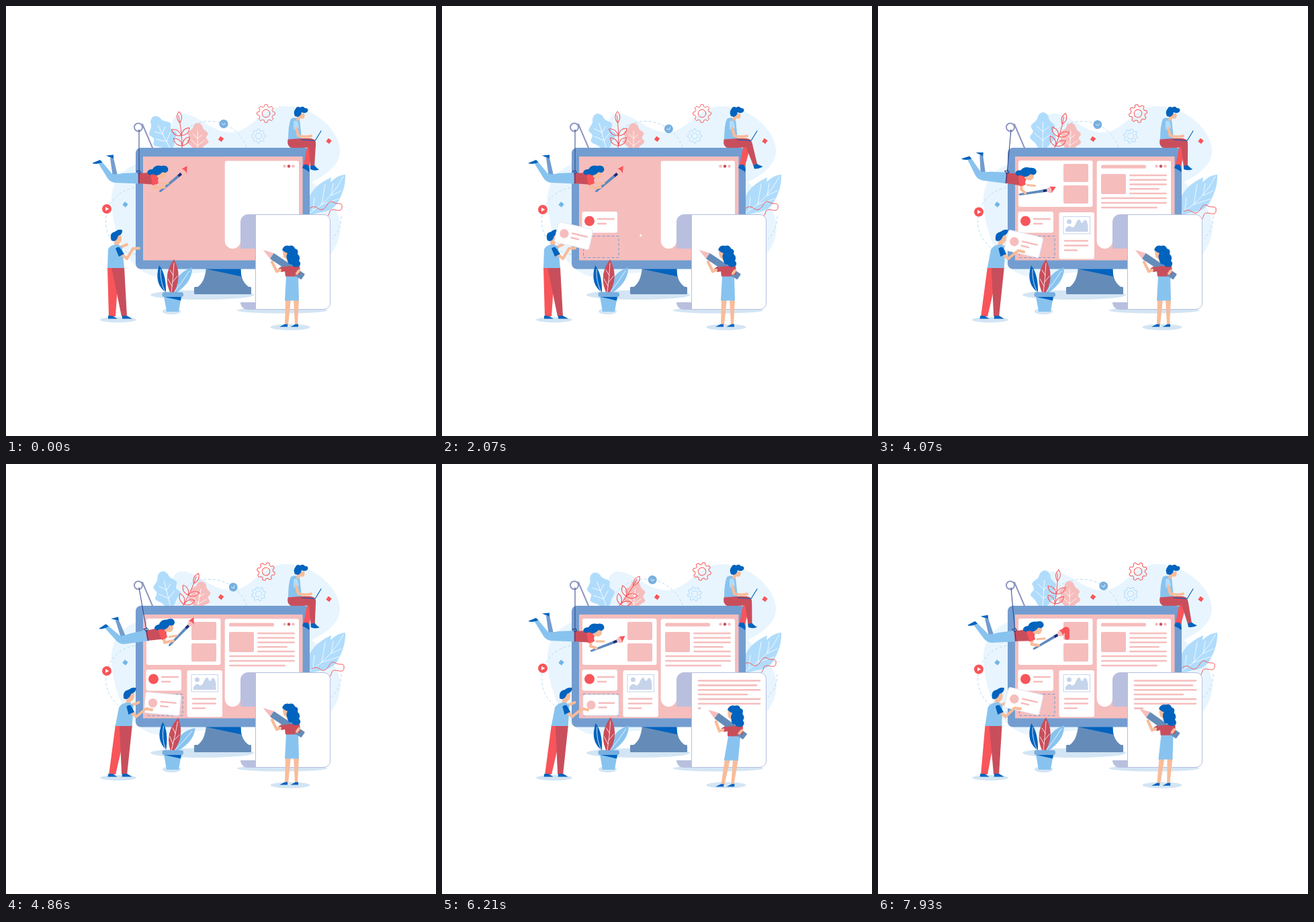
Animation of 640x640 px, one loop 8 s. Source, as an HTML page:

```html
<!DOCTYPE html>
<html lang="en">
<head>
<meta charset="utf-8">
<title>Building a web page</title>
<style>
html, body { margin: 0; width: 100%; height: 100%; overflow: hidden; background: #fff; }
svg { display: block; width: 100vw; height: 100vh; }
.navy { fill: #0063be } .steel { fill: #739dd0 } .blue { fill: #88c3ef } .sky { fill: #b0dcfc }
.pink { fill: #f6bdbd } .red { fill: #f8555a } .wine { fill: #c94e5c } .skin { fill: #f8bc9a }
.lilac { fill: #b9c0df } .shade { fill: #d3e5f4 } .white { fill: #fff }
.line { fill: none; stroke-linecap: round; stroke-linejoin: round; }
.vein { stroke: #fff; stroke-width: .8 }
.dash { fill: none; stroke: #b5dcf6; stroke-dasharray: 4 3 }
.arm { stroke: #f8bc9a; stroke-width: 4.2 }
.text { stroke: #f6bdbd; stroke-width: 2.6 }
</style>
</head>
<body>
<svg viewBox="0 0 640 640">
  <path fill="#e8f5fe" d="M205 232C170 240 155 265 157 295C160 335 178 395 225 403L470 380C495 365 500 335 497 320C494 300 470 275 455 262C480 250 498 235 497 213C493 180 455 149 415 149C380 150 365 188 335 188C305 188 285 160 262 160C248 160 246 175 247 185C245 205 230 225 205 232Z"/>
  <g class="dash">
    <circle cx="303" cy="230" r="58.5"/>
    <circle cx="198.500" cy="320" r="50"/>
    <path d="M499 313A49 49 0 0 1 485 347"/>
  </g>

  <g id="oak"><path class="sky" id="oakShape"/><path class="line vein" d="M0 0V-40M0 -13L-12 -23M0 -13L11 -22M0 -26L-9 -34M0 -26L8 -33"/></g>
  <g id="rose"><path class="pink" id="roseShape"/><path class="line vein" d="M0 0V-29M0 -7L-10 -16M0 -7L10 -15M0 -18L-7 -24M0 -18L6 -23"/></g>
  <g id="twig" class="line" stroke="#f8555a"></g>
  <g id="check"><circle r="6.500" fill="#78b0e0"/><path class="line vein" d="M-2.500 -.8L0 1.700L2.800 -1.200"/></g>
  <g id="play"><circle r="7" class="red"/><path class="white" d="M-2 -3L3.300 0L-2 3Z"/></g>
  <g id="gears" class="line"></g>
  <rect class="red" x="-3" y="-3" width="6" height="6" transform="translate(320 198) rotate(35)"/>
  <rect class="red" x="-3" y="-3" width="6" height="6" transform="translate(480.500 201) rotate(35)"/>
  <rect x="-3" y="-3" width="6" height="6" fill="#70b5e8" transform="translate(177.500 295.500) rotate(38)"/>

  <path class="sky" d="M450 312V288Q456 268 484 255L483 262Q493 252 505 251Q506 270 495 290Q488 305 468 307Z"/>
  <path class="line vein" d="M452 308Q485 288 502 254M470 295L475 265M468 296L495 287M484 282L487 264M484 282L499 275M457 304L459 285"/>
  <path id="squiggle" class="line" stroke="#f8555a" d="M452 301C462 294 464 305 471 303S479 287 487 292S501 290 500 300S484 298 482 306S474 318 469 317"/>

  <ellipse class="shade" cx="292" cy="430" rx="77" ry="7"/>
  <ellipse class="shade" cx="411" cy="453" rx="67" ry="4.500"/>
  <ellipse class="shade" cx="167" cy="467" rx="27" ry="4"/>
  <ellipse class="shade" cx="246.500" cy="454.500" rx="13.500" ry="4.500"/>
  <ellipse class="shade" cx="423" cy="478" rx="29.500" ry="4.500"/>

  <path fill="#658cb9" d="M298 390C296 406 292 414 284 419H363C354 414 350 406 349 390Z"/>
  <path class="navy" d="M296 391H349.500L350 402.500Z"/>
  <rect x="280" y="418" width="85" height="11" rx="1.500" fill="#658cb9"/>
  <rect class="steel" x="193" y="211" width="259" height="180.500" rx="8"/>
  <rect class="pink" x="204" y="224" width="237.500" height="154.500"/>

  <path class="white" d="M329 230.500H433a3 3 0 0 1 3 3V312H360L349 321V349.500a11.600 11.600 0 0 1 -23.300 0V233.500a3 3 0 0 1 3.300 -3Z"/>
  <circle class="pink" cx="414.500" cy="238.500" r="2.300"/>
  <circle class="wine" cx="421" cy="238.500" r="2.300"/>
  <circle class="pink" cx="427.500" cy="238.500" r="2.300"/>
  <rect id="title" class="pink" x="332" y="236.500" width="67" height="5.300" rx="2.600"/>
  <rect id="picture" class="pink" x="332" y="250" width="37" height="30" rx="2"/>
  <g id="article" class="pink"></g>

  <g id="panel"><rect class="white" x="209" y="230" width="110.500" height="69" rx="3"/></g>
  <rect id="tile1" class="pink" x="276" y="235" width="37" height="27" rx="2"/>
  <rect id="tile2" class="pink" x="276" y="267" width="37" height="27" rx="2"/>
  <path id="paint" class="line" stroke="#f8555a" stroke-width="7" pathLength="1" stroke-dasharray="1 2" d="M274 250Q282 243 281.500 248V258"/>

  <g id="cardA">
    <rect class="white" x="208.500" y="306" width="52.500" height="31.500" rx="3"/>
    <circle class="red" cx="219.500" cy="320" r="7.500"/>
    <path class="line text" d="M232 317H256M232 324H244"/>
  </g>
  <g id="imageCard">
    <rect class="white" x="269.500" y="307" width="52.500" height="69.500" rx="3"/>
    <path class="line text" d="M278 349.500H312M278 356.500H312M278 363.500H296"/>
  </g>
  <g id="image" fill="#c6d4eb">
    <rect x="276" y="313.500" width="39.500" height="25.500" fill="#fff" stroke="#c6d4eb"/>
    <circle cx="284.500" cy="321" r="3.500"/>
    <path d="M279 336V332Q284 325 288 329Q291 331 294 325Q298 315 301 319Q303 325 305 322Q308 315 311 321L312.500 327V336Z"/>
  </g>
  <rect id="slot" x="210.500" y="342.500" width="52.500" height="32" fill="none" stroke="#739dd0" stroke-dasharray="4 3"/>

  <path class="lilac" d="M373 310H360.500A11.500 11.500 0 0 0 349 321.500V361H373ZM349 441H373V452H360A11 11 0 0 1 349 441Z"/>
  <path fill="#fff" stroke="#b5bfe0" d="M371.500 310.500H473a9.500 9.500 0 0 1 9.500 9.500V442a9.500 9.500 0 0 1 -9.500 9.500H371.500Z"/>
  <g id="writing" class="line text"></g>

  <!-- flower pot -->
  <g id="potLeaves">
    <path class="navy" d="M240 428Q219 414 228 386Q239 400 238 428Z"/>
    <path class="blue" d="M248 428Q250 398 277 389Q278 411 252 428Z"/>
    <path class="wine" d="M245 428Q232 402 250 377Q264 403 249 428Z"/>
    <path class="line vein" d="M237 426Q229 410 230 392M246 426Q249 405 250 383M251 425Q262 412 273 394M247 417L241 406M248 411L255 402M249 401L244 393"/>
  </g>
  <path class="blue" d="M235 432H261L257 455H239Z"/>
  <path class="navy" d="M236 433H261L260 438.500Z"/>
  <rect x="232.500" y="426" width="31.500" height="7" rx="3" fill="#78afe0"/>

  <!-- man with the laptop -->
  <path class="red" d="M450 202H461L451 238L443 236Z"/>
  <path class="navy" d="M443 236L449 236Q453 243 451 247Q446 243 441 241Z"/>
  <g id="shin"><path class="wine" d="M450 199Q462 199 461 207L459 239H453Z"/><path class="navy" d="M453 238L459 237Q462 241 466 243.500Q460 246 453 243Z"/></g>
  <path class="wine" d="M420 197H454Q462 199 461 206Q455 211 440 211H424Q417 207 420 197Z"/>
  <path class="blue" d="M424 168Q430 164 437 169L440 197L420 198.500Q420 178 424 168Z"/>
  <path class="sky" d="M428 172Q433 168 435 175L436 182L428 184Z"/>
  <path class="line arm" d="M432 182L435 193Q445 196 454 193.500"/>
  <path class="skin" d="M434 160H444Q446 167 441 168L438 167L437 171L432 170Z"/>
  <path class="navy" d="M430 164Q427 157 431 153Q433 148 438 151Q442 148 445 152Q451 152 449 157Q445 161 440 158Q439 164 434 165Z"/>
  <path class="line" stroke="#0063be" stroke-width="1.200" d="M440 199L460 200.500L469 186"/>

  <!-- hanging painter -->
  <g class="line" stroke="#8f97c2" stroke-width="2"><circle cx="197" cy="180.500" r="6"/><path d="M203 176L218 211"/></g>
  <g id="painter">
    <path class="steel" d="M155 226H160L166 252L159 255Z"/>
    <path class="blue" d="M198 248V264.500L162 263Q155 262 151 256L138 235L143 232L158 250Q166 251 173 249Z"/>
    <path class="navy" d="M129 233.500L140 229L143.500 232.500Q138 236 129 234.500ZM149 222.500L160 221.500V227Q154 225 149 222.500Z"/>
    <path class="wine" d="M196.500 249L217 248Q226 250 227 256L224 266L196.500 264Z"/>
    <path class="line" stroke="#2c4286" d="M198 184V264M197 249L194 246L199 245L201 248L197 250"/>
    <path class="skin" d="M225 247H238Q239 255 233 257L224 255Z"/>
    <path class="navy" d="M210 248Q211 243 218 243Q222 236 231 238Q241 236 241.500 244Q239 250 233 247Q228 253 222 252Q214 254 210 248Z"/>
    <g id="brush">
      <path d="M-10 0L-8 -1.500L27 -2V2L-8 1.500Z" fill="#5f8abf"/>
      <path fill="#1b2f73" d="M27 -2H33V2H27Z"/>
      <path class="pink" d="M33 -2Q36 -5 41 -4L40 5Q36 5 33 2Z"/>
      <path class="red" d="M38 -5L47 -3L39 5Q41 0 38 -5Z"/>
    </g>
    <path class="line arm" id="forearm"/>
    <path class="line arm" style="stroke-width:3" d="M230 264L241 264"/>
    <path class="red" d="M215 251Q222 249 225 254L227 264L218 267Z"/>
  </g>

  <!-- man with the card -->
  <g class="walker">
    <path class="red" d="M151 389H168L163 462H153Z"/>
    <path class="wine" d="M157 389H176L180 462H172Z"/>
    <path class="navy" d="M152 461H158L166 465.500H152ZM173 461H180L188 465.500H173Z"/>
    <path class="line arm" d="M166 359L173 358L180 355"/>
    <path class="skin" d="M162 341H171Q174 350 169 353L167 357H161Z"/>
    <path class="blue" d="M152 362Q156 354 167 355L173 359L176 390H151Z"/>
    <path class="navy" d="M157 349Q153 338 162 336Q168 331 173 333.500Q174 340 167 342Q165 350 160 350Z"/>
  </g>
  <g id="cardB">
    <rect class="white" x="-26.500" y="-15.500" width="53" height="31" rx="3" stroke="#dfe2f0" stroke-width=".8"/>
    <circle class="pink" cx="-14.500" cy="0" r="6.700"/>
    <path class="line text" d="M-2.500 -3H19.500M-2.500 3.500H8"/>
  </g>
  <g class="walker">
    <path class="line arm" d="M170 368L180 376"/>
    <path class="line arm" id="cardArm" d="M180 376L189 361L198 360.500"/>
    <path class="navy" d="M163 361Q168 356 171 362L176 369L168 373Z"/>
  </g>

  <!-- writer -->
  <g id="writer">
    <path class="skin" d="M416 436H424L420 475H415ZM428 436H436L434 475H430Z"/>
    <path class="navy" d="M407 477.500L415 473.500H419V477.500ZM423.500 477.500L431 473.500H435V477.500Z"/>
    <path class="blue" d="M417 401H435L436 438.500H415Z"/>
    <path class="wine" d="M411 387H432Q437 389 438 400L434 402.500H416L415 395L410 396L405 391Z"/>
    <path class="line arm" d="M408 393L403 395L396 381"/>
    <g transform="translate(382.500 363) rotate(34)">
      <path class="pink" d="M0 0L16 -5V5Z"/><rect x="16" y="-5" width="56" height="10" rx="1" fill="#658cb9"/>
    </g>
    <path class="wine" d="M413 388L437 386L438 400L417 400Z"/>
    <path class="line arm" d="M436 394L433 398"/>
    <path class="skin" d="M412 364H423V380H418L417 376Q412 376 412 364Z"/>
    <path class="navy" d="M411 363Q414 355 421 357Q428 355 430 361Q436 362 434 369Q439 374 436 379Q441 385 435 388Q428 390 425 385Q419 385 419 378Q416 373 419 368Q415 367 411 363Z"/>
  </g>
</svg>
<script>
const $ = id => document.getElementById(id);
const move = (id, value) => $(id).setAttribute('transform', value);
const clamp = v => Math.max(0, Math.min(1, v));
const progress = (t, from, to) => clamp((t - from) / (to - from));

// Smooth value through (time, value) pairs
function track(t, ...keys) {
  if (t <= keys[0]) return keys[1];
  for (let i = 2; i < keys.length; i += 2) {
    if (t < keys[i]) {
      const p = progress(t, keys[i - 2], keys[i]);
      return keys[i - 1] + (keys[i + 1] - keys[i - 1]) * p * p * (3 - 2 * p);
    }
  }
  return keys[keys.length - 1];
}

function pop(id, cx, cy, scale) {
  move(id, `translate(${cx} ${cy}) scale(${scale}) translate(${-cx} ${-cy})`);
}

function lobedLeaf(width, height) {
  const side = sign => Array.from({ length: 61 }, (_, i) => {
    const p = i / 60;
    const half = width * Math.sin(Math.PI * p ** .95) ** .6 * (1 - .28 * p) * (1 + .15 * Math.cos(Math.PI * 6 * p + .6));
    return `${(sign * half).toFixed(1)} ${(-height * p).toFixed(1)}`;
  });
  return 'M' + [...side(-1), ...side(1).reverse()].join('L') + 'Z';
}

function gear(id, radius, color) {
  const points = Array.from({ length: 96 }, (_, i) => {
    const a = i / 96 * 2 * Math.PI;
    const r = radius * (.885 + .115 * Math.tanh(3 * Math.cos(8 * a)));
    return `${(r * Math.sin(a)).toFixed(2)} ${(-r * Math.cos(a)).toFixed(2)}`;
  });
  return `<g id="${id}" stroke="${color}"><path d="M${points.join('L')}Z"/><circle r="${radius * .43}"/></g>`;
}

$('oakShape').setAttribute('d', lobedLeaf(20, 55));
$('roseShape').setAttribute('d', lobedLeaf(17, 41));
$('gears').innerHTML = gear('gearRed', 13.5, '#f8555a') + gear('gearBlue', 10.5, '#b0dcfc');
$('twig').innerHTML = '<path d="M0 0Q3 -25 0 -50"/>' +
  [[-39, 0], [-20, -52], [-20, 52], [-5, -45], [-5, 45]].map(([y, a]) =>
    `<path transform="translate(1 ${y}) rotate(${a})" d="M0 0Q-7 -9 0 -17Q7 -9 0 0Z"/>`).join('');

const articleLines = [
  [374, 430, 252], [374, 430, 258.7], [374, 430, 265.5], [374, 419, 272.3], [374, 430, 279],
  [332, 430, 286], [332, 430, 293], [332, 416, 300]
];
const writtenEnds = [473, 468, 473, 454, 473, 473, 394];
$('writing').innerHTML = writtenEnds.map(() => '<path/>').join('');

function draw(t) {
  // Scenery
  const oak = track(t, 500, -28, 1300, -4, 2070, -16, 2860, -9, 3800, 3, 4070, 1, 4860, -14, 5600, -27, 6210, -21, 7500, 5, 7930, 4);
  move('oak', `translate(245 213) rotate(${oak})`);
  move('rose', `translate(285 215) rotate(${track(t, 500, 1, 2860, 0, 4070, 4, 4860, 10, 5500, 12, 6210, 5, 7930, 0)})`);
  const twig = track(t, 500, -6, 1400, -10, 2070, -2, 2860, 4, 4070, 17, 4860, 25, 6210, 34, 7930, 6);
  move('twig', `translate(262 213) rotate(${twig})`);
  const orbit = track(t, 500, -69, 1000, -80, 2070, -54, 2860, -70, 3450, -80, 4070, -66, 4860, -53, 6210, -80, 7660, -53, 7930, -56);
  const a = orbit * Math.PI / 180;
  move('check', `translate(${303 + 58.5 * Math.cos(a)} ${230 + 58.5 * Math.sin(a)}) rotate(${(orbit + 69) * -1.5})`);
  move('play', `translate(150 ${track(t, 500, 302, 2070, 303, 4070, 306.5, 4860, 308, 6210, 304, 7930, 305.5)})`);
  const turn = Math.max(0, t - 3000) * .032;
  move('gearRed', `translate(387 160) rotate(${turn})`);
  move('gearBlue', `translate(376 193.500) rotate(${-turn})`);
  move('squiggle', `translate(${track(t, 3050, 0, 4070, 3, 4860, 3, 6210, -3, 7930, 1)} ${track(t, 3050, 0, 4070, 5, 4860, 4, 6210, -3, 7930, 2)})`);
  move('potLeaves', `rotate(${track(t, 500, 0, 4070, 0, 4860, 7, 5500, 5, 6210, 1, 7930, 0)} 247 428)`);
  move('shin', `rotate(${track(t, 500, 0, 1100, -18, 1550, 0, 2070, -17, 2860, -5, 4070, -3, 4500, -17, 4860, -1, 5500, -17, 6210, -4, 7100, 0, 7930, -13)} 456 203)`);

  // Page content
  pop('cardA', 234.5, 321.5, track(t, 1300, 0, 1800, 1));
  $('slot').setAttribute('opacity', progress(t, 700, 1200));
  pop('imageCard', 295.8, 341.5, track(t, 1980, 0, 2650, 1));
  pop('panel', 264, 264.5, track(t, 2150, 0, 2700, 1));
  pop('image', 295.8, 326, track(t, 2700, 0, 3100, 1));
  $('title').setAttribute('transform', `translate(365.500 0) scale(${track(t, 2600, 0, 3100, 1)} 1) translate(-365.500 0)`);
  pop('picture', 350.5, 265, track(t, 2450, 0, 2950, 1));
  pop('tile1', 294.5, 248.5, track(t, 3000, 0, 3500, 1));
  pop('tile2', 294.5, 280.5, track(t, 3200, 0, 3700, 1));
  const grow = progress(t, 2400, 2880), thick = progress(t, 2700, 3150) * 1.3;
  $('article').innerHTML = grow ? articleLines.map(([x1, x2, y]) => {
    const end = x1 + (x2 - x1) * grow;
    return `<path d="M${x1 + 1} ${y - 1.3}L${end - 1} ${y - thick}Q${end + 1} ${y} ${end - 1} ${y + thick}L${x1 + 1} ${y + 1.3}Q${x1 - 1} ${y} ${x1 + 1} ${y - 1.3}Z"/>`;
  }).join('') : '';
  [...$('writing').children].forEach((line, i) => {
    const start = 4880 + i * 215, p = progress(t, start, start + 215);
    line.setAttribute('d', p ? `M382 ${322.5 + i * 6.85}H${382 + (writtenEnds[i] - 382) * p}` : '');
  });
  const paint = progress(t, 7250, 7850);
  $('paint').setAttribute('stroke-dashoffset', 1 - paint);
  $('paint').setAttribute('opacity', paint ? 1 : 0);

  // Painter
  const swing = track(t, 3050, 0, 3900, 7, 4070, 5.2, 4860, -9.9, 5650, 11, 6210, 0, 6600, -4, 7290, -5.2);
  move('painter', `rotate(${swing} 198 184)`);
  const tilt = track(t, 2900, -40, 4070, -14, 4860, -36, 5500, -18, 6210, -21, 7300, -34, 7930, -25);
  const handX = 235.7 - .315 * (tilt + 40), handY = 270.6 + .246 * (tilt + 40);
  move('brush', `translate(${handX} ${handY}) rotate(${tilt})`);
  $('forearm').setAttribute('d', `M222 264L221 271L${handX} ${handY - 1}`);

  // Card carrier
  const lean = track(t, 3050, 0, 3900, .16, 7290, .16, 7930, .115);
  for (const part of document.querySelectorAll('.walker')) {
    part.setAttribute('transform', `matrix(1 0 ${-lean} 1 ${lean * 463} 0)`);
  }
  move('cardArm', `rotate(${lean * 100} 180 376)`);
  const drop = progress(t, 500, 1950) ** 1.8;
  const cardX = track(t, 3050, 196, 4070, 217, 4860, 233, 5150, 236.5, 7000, 236.5, 7900, 217);
  const cardY = track(t, 3050, 342, 4070, 354, 4860, 357, 5150, 358.7, 7000, 358.7, 7900, 353) - 307 * (1 - drop);
  const cardTurn = track(t, 4070, 13, 4860, 5, 5150, 0, 7000, 0, 7900, 13);
  move('cardB', `translate(${cardX} ${cardY}) rotate(${cardTurn})`);
  $('cardB').setAttribute('opacity', t < 500 ? 0 : 1);

  // Writer
  const reach = track(t, 4860, 0, 5300, .11, 5700, .03, 6210, .12, 6900, .02, 7500, .1, 7930, .06);
  move('writer', `matrix(1 0 ${-reach} 1 ${reach * 478} ${reach * 22})`);
}

function frame(now) {
  draw(now % 8000);
  requestAnimationFrame(frame);
}
draw(0);
requestAnimationFrame(frame);
</script>
</body>
</html>
```
